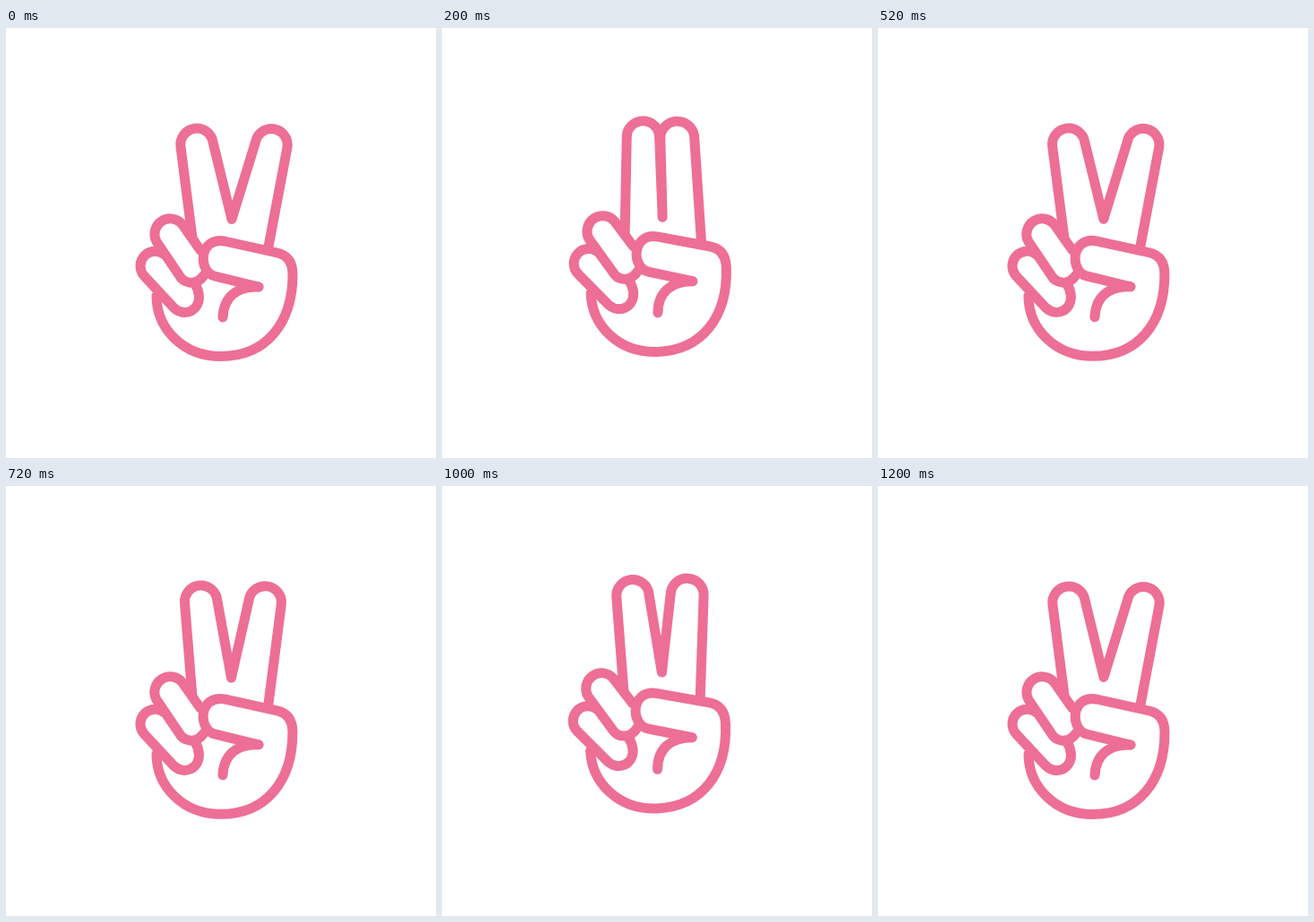
An HTML page that plays this animation: 480 by 480 pixels, repeating every 2240 ms.

```html
<!DOCTYPE html>
<html lang="en">
<head>
<meta charset="utf-8">
<title>Peace hand</title>
<style>
  html, body { margin: 0; width: 100%; height: 100%; overflow: hidden; background: #fff; }
  svg { display: block; width: 100%; height: 100%; }
  path { fill: none; stroke: #ed6f95; stroke-width: 11; stroke-linecap: round; stroke-linejoin: round; }
</style>
</head>
<body>
<svg viewBox="0 0 480 480">
  <g id="hand">
    <path id="fingers"/>
    <!-- ring finger, little finger -->
    <path d="M217 248 L197 219.5 A17.4 17.4 0 0 0 168 238.5 L193 275.5 C198 285 212 289 221 276"/>
    <path d="M177 253 A16.5 16.5 0 0 0 154 276.5 L187.5 312.5 C199 323 215.5 316 215.5 300 Q215 292 211 286"/>
    <!-- thumb and palm -->
    <path d="M282 289 L233 277 C214 272 215 233 244 238 L303 251 Q320 255 320 275 C320 330 290 366.5 240 366.5 C197 366.5 168 335 168 299"/>
    <path d="M242 323 C243 300 258 288 282 289"/>
  </g>
</svg>
<script>
const LOOP = 2240, STEP = 40, TILT = 2.64;

const hand = document.getElementById('hand');
const fingers = document.getElementById('fingers');

const mix = (a, b, k) => a + (b - a) * k;

function ease(t, from, length) {
  const k = Math.min(1, Math.max(0, (t - from) / length));
  return k * k * (3 - 2 * k);
}

// rise and fall over 500 ms
const swell = t => t > 0 && t < 500 ? Math.sin(Math.PI * t / 500) ** 2 : 0;

// quick close, short hold, slower opening
const snip = t => ease(t, 0, 120) - ease(t, 200, 240);

// round fingertip around x, y, leaning by deg
function tip(x, y, r, deg) {
  const a = deg * Math.PI / 180, dx = r * Math.cos(a), dy = r * Math.sin(a);
  return `L${x - dx} ${y - dy} A${r} ${r} 0 0 1 ${x + dx} ${y + dy}`;
}

function draw(ms) {
  const t = Math.floor((ms % LOOP) / STEP) * STEP;
  const lift = swell(t - 45) + swell(t - 697);
  const shut = snip(t - 80) + snip(t - 680);
  const index = tip(mix(213, 231.7, shut), mix(130.2, 126.5, shut), 18.2, mix(-8.8, 2, shut));
  const middle = tip(mix(296.2, 270, shut), mix(130.5, 129, shut), mix(18, 19, shut), mix(9, 3.3, shut));
  const valley = `L${mix(252, 250.6, shut)} ${mix(213.5, 216.5, shut)}`;
  fingers.setAttribute('d', `M208 234 ${index} ${valley} ${middle} L293 244`);
  hand.setAttribute('transform', `rotate(${-TILT * lift} 80 355)`);
}

const start = performance.now();
function tick() {
  draw(performance.now() - start);
  requestAnimationFrame(tick);
}
tick();
</script>
</body>
</html>
```
